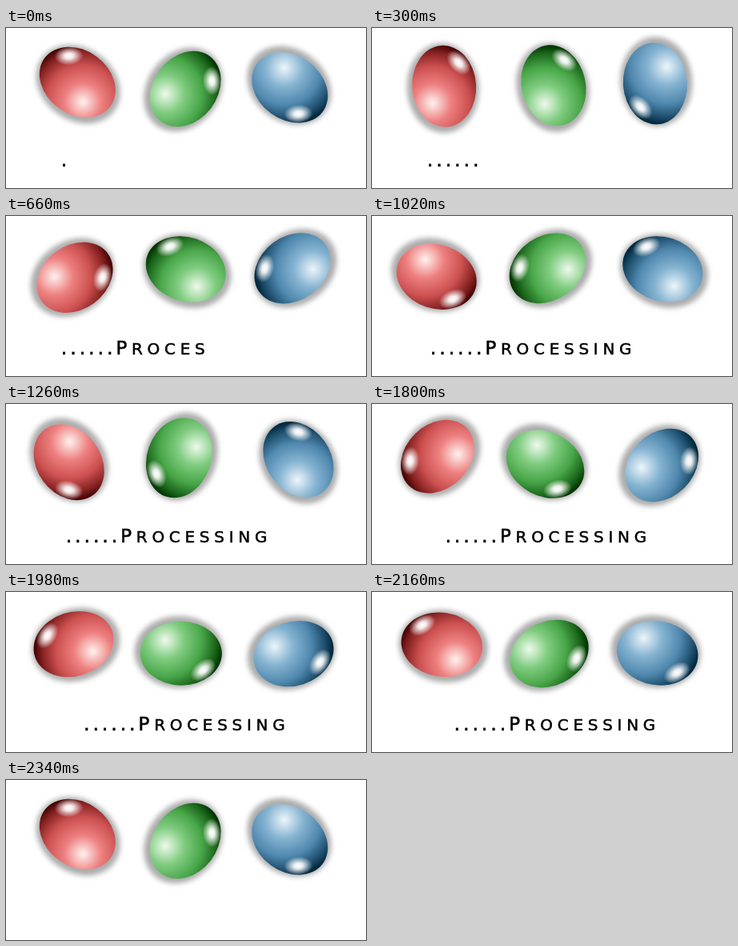
Animation of 450 by 200 pixels, one loop 2.4 s. Source, as an HTML page:

```html
<!DOCTYPE html>
<html lang="en">
<head>
<meta charset="utf-8">
<title>Processing</title>
<style>
  html, body { margin: 0; width: 100%; height: 100%; overflow: hidden; background: #fff; }
  svg { display: block; }
  text { font-family: "DejaVu Sans", sans-serif; stroke: #000; stroke-width: .5px; }
  .dots { font-size: 24px; letter-spacing: 3.8px; }
  .initial { font-size: 23px; letter-spacing: 5.7px; }
  .rest { font-size: 20px; letter-spacing: 5.7px; }
  .halo { fill: #acacac; filter: blur(3px); }
</style>
</head>
<body>
<svg id="stage" width="450" height="200" viewBox="0 0 450 200">
  <defs>
    <radialGradient id="glint">
      <stop offset="0" stop-color="#fff"/>
      <stop offset=".3" stop-color="#fff" stop-opacity=".9"/>
      <stop offset="1" stop-color="#fff" stop-opacity="0"/>
    </radialGradient>
  </defs>
  <g id="gems"></g>
  <text id="label" y="173"><tspan class="dots"></tspan><tspan class="initial"></tspan><tspan class="rest"></tspan></text>
</svg>
<script>
const FRAME = 60, FRAMES = 40;

// x: pivot, start: angle of the long axis, dir: sense of rotation
const gems = [
  { x: 84.4, start: 216, dir: 1, colors: ['#fff2ee', '#ee8080', '#cc5050', '#842020', '#460404'] },
  { x: 221, start: -53, dir: -1, colors: ['#eefaec', '#80cc80', '#48a648', '#1a641a', '#003400'] },
  { x: 359.7, start: 36, dir: 1, colors: ['#edf5fa', '#86b4d2', '#5088ae', '#1c4c6a', '#00263c'] }
];
const offsets = [0, .32, .63, .87, 1];

const gemMarkup = ({ colors }, i) => `
  <radialGradient id="shade${i}" gradientUnits="userSpaceOnUse" cx="-20" cy="-16" r="73">
    ${colors.map((c, k) => `<stop offset="${offsets[k]}" stop-color="${c}"/>`).join('')}
  </radialGradient>
  <g class="gem">
    <ellipse class="halo" cx="-2.2" cy="-1.6" rx="56" ry="45"/>
    <ellipse rx="51" ry="40" fill="url(#shade${i})"/>
    <ellipse rx="11.5" ry="18" fill="url(#glint)" transform="translate(28 20.3) rotate(50)"/>
  </g>`;

document.getElementById('gems').innerHTML = gems.map(gemMarkup).join('');
const gemNodes = document.querySelectorAll('.gem');
const label = document.getElementById('label');
const [dots, initial, rest] = label.children;

// The first quarter turn takes 9 frames, the others 10 each
const turn = f => f < 9 ? f * 10 : 90 + (f - 9) * 9;

const labelX = f => 68.8 + Math.min(Math.max(f - 11, 0), 4) + Math.max(f - 20, 0) * 1.86;

function draw(f) {
  gems.forEach(({ x, start, dir }, i) => gemNodes[i].setAttribute('transform',
    `translate(${x} 71.1) rotate(${start + dir * turn(f)}) translate(-2.05 5.64)`));

  const typed = f === FRAMES - 1 ? '' : '......PROCESSING'.slice(0, f + 1);
  dots.textContent = typed.slice(0, 6);
  initial.textContent = typed.slice(6, 7);
  rest.textContent = typed.slice(7);
  label.setAttribute('x', labelX(f));
}

function tick() {
  draw(Math.floor(performance.now() / FRAME) % FRAMES);
  requestAnimationFrame(tick);
}
tick();
</script>
</body>
</html>
```
